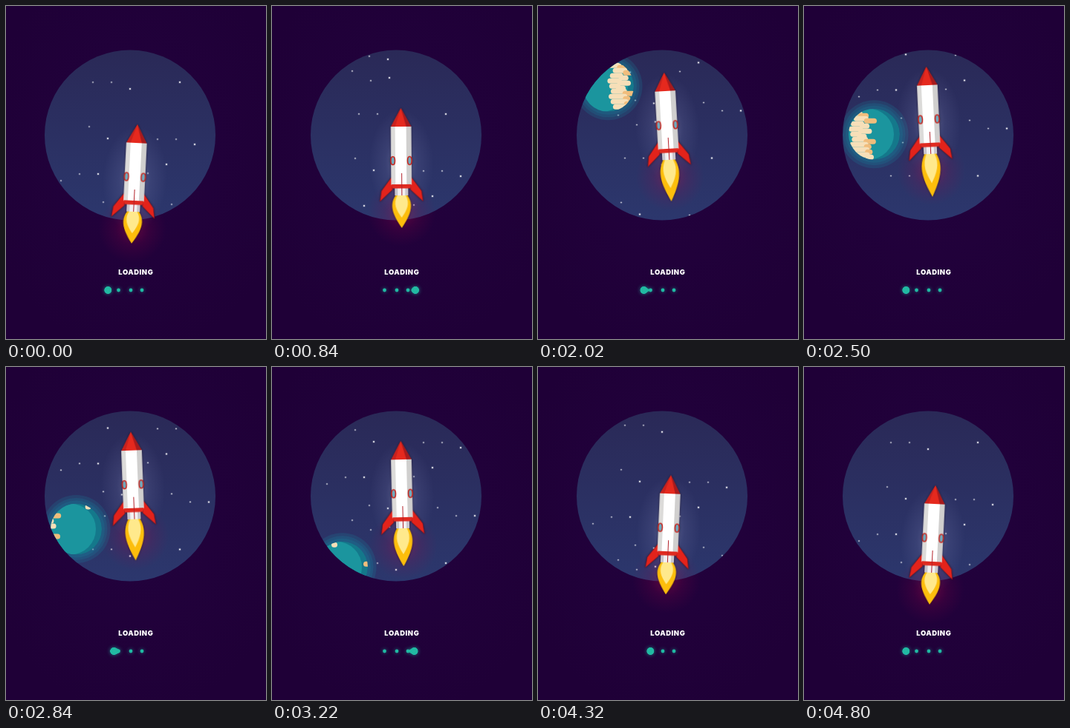
Animation of 350 by 450 pixels, one loop 4.82 s. Source, as an HTML page:

```html
<!DOCTYPE html>
<html lang="en">
<head>
<meta charset="utf-8">
<title>Loading</title>
<style>
  html, body { margin: 0; width: 100%; height: 100%; overflow: hidden; background: #1f0038; }
  svg { display: block; width: 100%; height: 100%; }
  text { font: 900 9.4px Inter, sans-serif; letter-spacing: .55px; fill: #fff; text-anchor: middle; }
  #ship { filter: drop-shadow(0 0 1.5px #1008); }
  #loader { fill: #20b9a3; filter: drop-shadow(0 0 2.5px #20b9a3b0); }
</style>
</head>
<body>
<svg viewBox="0 0 350 450">
  <defs>
    <radialGradient id="space" cy=".45" r=".6">
      <stop stop-color="#23023e"/><stop offset="1" stop-color="#1f0037"/>
    </radialGradient>
    <linearGradient id="sky" x2="0" y2="1">
      <stop stop-color="#2a2957"/><stop offset="1" stop-color="#2c376d"/>
    </linearGradient>
    <radialGradient id="shine">
      <stop stop-color="#dfe3ff" stop-opacity=".36"/>
      <stop offset=".5" stop-color="#8f93c4" stop-opacity=".14"/>
      <stop offset="1" stop-color="#8f93c4" stop-opacity="0"/>
    </radialGradient>
    <radialGradient id="heat">
      <stop stop-color="#d81448" stop-opacity=".38"/>
      <stop offset=".5" stop-color="#a80048" stop-opacity=".15"/>
      <stop offset="1" stop-color="#900048" stop-opacity="0"/>
    </radialGradient>
    <clipPath id="porthole"><circle cx="167" cy="174.5" r="115"/></clipPath>
    <clipPath id="globe"><circle r="34.5"/></clipPath>
    <filter id="goo" filterUnits="userSpaceOnUse" x="120" y="368" width="94" height="32">
      <feGaussianBlur stdDeviation="2"/>
      <feColorMatrix values="1 0 0 0 0  0 1 0 0 0  0 0 1 0 0  0 0 0 10 -3.5"/>
    </filter>
  </defs>

  <rect width="350" height="450" fill="url(#space)"/>
  <circle cx="167" cy="174.5" r="115" fill="url(#sky)"/>

  <g clip-path="url(#porthole)">
    <g id="stars" fill="#fff"></g>
    <g id="planet">
      <g fill="#1789a0" fill-opacity=".2">
        <circle r="46"/><circle r="42"/><circle r="38.5"/>
      </g>
      <g clip-path="url(#globe)">
        <circle r="34.5" fill="#14788b"/>
        <circle cx="-8" r="34.5" fill="#1b959e"/>
        <g id="clouds"></g>
      </g>
    </g>
  </g>

  <g id="rocket">
    <ellipse cy="3" rx="43" ry="72" fill="url(#shine)"/>
    <circle cy="70" r="46" fill="url(#heat)"/>
    <g id="ship">
      <g id="flame">
        <path d="M-8 0C-17 13-12 26 0 44C12 26 17 13 8 0Z" fill="#fdbe0c"/>
        <path d="M-5.500 0C-12 11-7 20 0 30C7 20 12 11 5.500 0Z" fill="#ffe98c"/>
      </g>
      <path d="M-9 36H9V47H-9Z" fill="#f2f0f2"/>
      <path d="M-9 36H-5V47H-9ZM5 36H9V47H5Z" fill="#c9c5cc"/>
      <g fill="#e3231b" stroke="#7d1020" stroke-width=".6">
        <path id="fin" d="M-13 22L-27 41L-29 55L-12 39Z"/>
        <use href="#fin" transform="scale(-1 1)"/>
      </g>
      <path d="M-13.500-46H13.500V33H-13.500Z" fill="#fff"/>
      <path d="M-13.500-46H-8V33H-13.500Z" fill="#dcdbd9"/>
      <path d="M7-46H13.500V33H7Z" fill="#d0cfce"/>
      <path d="M-13.500 32H13.500L12 37.500H-12Z" fill="#e02a20"/>
      <path d="M0-71L13.500-46H-13.500Z" fill="#e5291e"/>
      <path d="M0-71L13.500-46H7Z" fill="#a81a1c"/>
      <path d="M0-71L-8-46H-13.500Z" fill="#c9211d"/>
      <path d="M.5 17V47" stroke="#b3222a"/>
      <g fill="#6fabbf" stroke="#c8261f" stroke-width="1.600">
        <ellipse cx="-11.300" rx="2.800" ry="5.500"/><ellipse cx="11.300" rx="2.800" ry="5.500"/>
      </g>
    </g>
  </g>

  <text x="174.800" y="362.700">LOADING</text>
  <g id="loader">
    <g filter="url(#goo)"><use href="#dots"/><circle id="ball" cy="384" r="4.900"/></g>
    <g id="dots">
      <circle cx="151.500" cy="384" r="2.400"/>
      <circle cx="168" cy="384" r="2.400"/>
      <circle cx="183" cy="384" r="2.400"/>
    </g>
  </g>
</svg>
<script>
const LOOP = 4820, DRIFT = 240, SKY_TOP = 52, STAR_GAP = 25;
const { sin, cos, PI } = Math;
const $ = id => document.getElementById(id);
const place = (node, value) => node.setAttribute('transform', value);

function add(parent, tag, attrs) {
  const node = document.createElementNS('http://www.w3.org/2000/svg', tag);
  for (const key in attrs) node.setAttribute(key, attrs[key]);
  return parent.appendChild(node);
}

let seed = 11;
const random = () => (seed = seed * 16807 % 2147483647) / 2147483647;

// Constellations: left edge, then the height of each evenly spaced star; the last one is brightest
const stars = [
  [117, 103, 103, 112], [112, 163, 179], [204, 180, 180, 187], [74, 236, 227, 227], [191, 226, 214],
  [223, 268, 279, 279], [131, 265, 269], [108, 285, 298, 294], [234, 103]
].flatMap(([left, ...heights]) => heights.map((y, i) => {
  const node = add($('stars'), 'g', {}), r = i === heights.length - 1 ? 1 : .8;
  add(node, 'circle', { r: r * 2, opacity: .18 });
  add(node, 'circle', { r, opacity: r * .95 });
  return { node, x: left + STAR_GAP * i, y };
}));

function addCloud(x, y, width, fill) {
  add($('clouds'), 'rect', { x, y: y - 3.5, width, height: 7, rx: 3.5, fill });
}
const CREAM = '#f6dfb8', ORANGE = '#f0bd7c';
for (let y = -28; y <= 28; y += 7) {
  const left = -36 + 10 * random(), width = 14 + 14 * random();
  addCloud(left, y, width, CREAM);
  addCloud(left + width - 6, y + 3, 10 + 14 * random(), random() < .5 ? ORANGE : CREAM);
}
addCloud(36, -30, 8, CREAM);
addCloud(79, -4, 8, ORANGE);

// Flight path: time, x, y
const path = [[0, 173.5, 231], [840, 174, 209], [1460, 181, 180], [2500, 168, 153], [3220, 175, 171], [3860, 178, 196]];

function pathPoint(i) {
  const turn = Math.floor(i / path.length);
  const [time, x, y] = path[i - turn * path.length];
  return [time + turn * LOOP, x, y];
}

// Monotone cubic through the path, so turning points stay flat
function fly(t, axis) {
  const i = path.findLastIndex(point => point[0] <= t);
  const [p, a, b, q] = [i - 1, i, i + 1, i + 2].map(pathPoint);
  const rate = (u, v) => (v[axis] - u[axis]) / (v[0] - u[0]);
  const slope = (m, n) => m * n > 0 ? 2 * m * n / (m + n) : 0;
  const mid = rate(a, b), span = b[0] - a[0], s = (t - a[0]) / span, r = 1 - s;
  return a[axis] * r * r * (1 + 2 * s) + b[axis] * s * s * (3 - 2 * s)
    + span * s * r * (r * slope(rate(p, a), mid) - s * slope(mid, rate(b, q)));
}

const ease = u => u < .5 ? 8 * u ** 4 : 1 - 8 * (1 - u) ** 4;

function draw() {
  const t = performance.now() % LOOP, phase = t / LOOP, angle = 2 * PI * phase;

  const fallen = DRIFT * phase + 2 * sin(PI * phase);
  for (const { node, x, y } of stars) {
    place(node, `translate(${x} ${SKY_TOP + (y - SKY_TOP + fallen) % DRIFT})`);
  }

  const passed = t - 2500;
  place($('planet'), `translate(94.5 ${173 + .135 * passed})`);
  place($('clouds'), `translate(${-.07 * passed})`);

  const tilt = -.55 + 2.85 * cos(angle) - sin(angle) + .55 * cos(2 * angle);
  const thrust = ((1 - cos(angle)) / 2) ** 2;
  place($('rocket'), `translate(${fly(t, 1)} ${fly(t, 2)}) rotate(${tilt})`);
  place($('flame'), `translate(0 47) scale(1 ${(43 + 15 * thrust) / 44})`);

  const swing = 4 * phase % 2;
  $('ball').setAttribute('cx', 137.3 + 59.7 * ease(swing < 1 ? swing : 2 - swing));
  requestAnimationFrame(draw);
}
draw();
</script>
</body>
</html>
```
